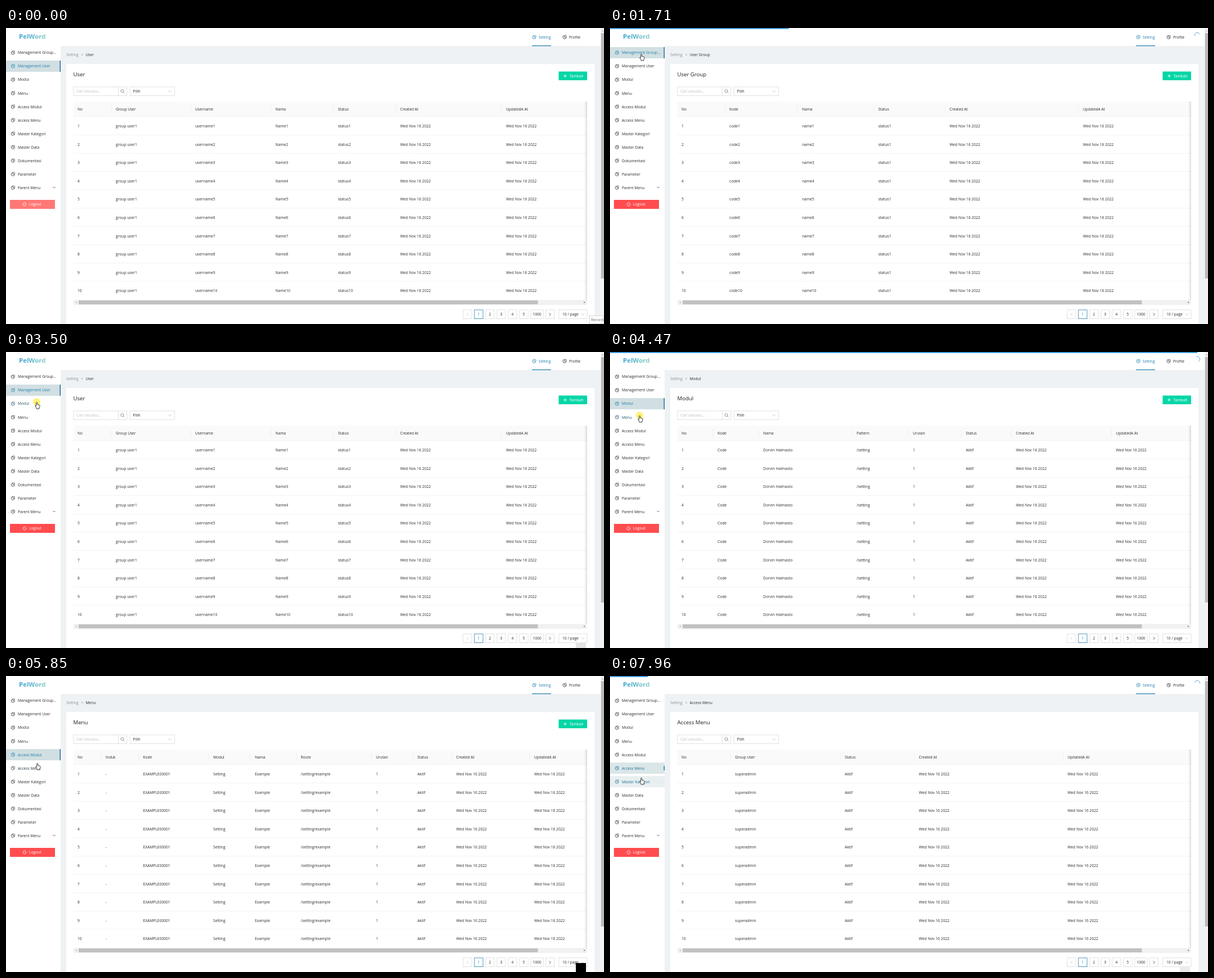
An HTML page with a canvas that plays this animation: 1062x527 px, repeating every 8 s.

```html
<!DOCTYPE html>
<html lang="id">
<head>
<meta charset="utf-8">
<title>Admin panel</title>
<style>
  html, body { margin: 0; width: 100%; height: 100%; overflow: hidden; background: #fff; }
  canvas { display: block; width: 1062px; height: 527px; }
</style>
</head>
<body>
<canvas id="stage"></canvas>
<script>
const W = 1062, H = 527, LOOP = 8000;
const canvas = document.getElementById('stage');
const dpr = window.devicePixelRatio || 1;
canvas.width = W * dpr;
canvas.height = H * dpr;
const c = canvas.getContext('2d');
c.scale(dpr, dpr);

const INK = '#2a2a2a', BLUE = '#1f7fae', LINE = '#d9d9d9', BAR = '#2493dd';
const FONT = '"Open Sans", "Noto Sans", sans-serif';
const DATE = 'Wed Nov 16 2022';

const items = ['Management Group...', 'Management User', 'Modul', 'Menu', 'Access Modul', 'Access Menu',
  'Master Kategori', 'Master Data', 'Dokumentasi', 'Parameter', 'Parent Menu'];

// Columns are [x, heading, cell]; '#' in a cell is the row number.
const page = (title, dateX, updateX, cols, add = true) => ({
  title, add,
  cols: [[127, 'No', '#'], ...cols, [dateX, 'Created At', DATE], [updateX, 'UpdatedA At', DATE]]
});
const accessCols = [[222, 'Group User', 'superadmin'], [417, 'Status', 'Aktif']];
const user = page('User', 700, 888, [[195, 'Group User', 'group user1'], [336, 'Username', 'username#'],
  [478.5, 'Nama', 'Name#'], [589.5, 'Status', 'status#']]);
const group = page('User Group', 603, 840, [[212, 'Kode', 'code#'], [341, 'Nama', 'name#'], [476.5, 'Status', 'status1']]);
const modul = page('Modul', 721, 898.5, [[191, 'Kode', 'Code'], [272, 'Nama', 'Dorvin Halmasto'],
  [438, 'Pattern', '/setting'], [538, 'Urutan', '1'], [632, 'Status', 'Aktif']]);
const menu = page('Menu', 799.5, 938, [[177, 'Induk', '-'], [243.5, 'Kode', 'EXAMPLE00001'], [368, 'Modul', 'Setting'],
  [442, 'Nama', 'Example'], [523.5, 'Route', '/setting/example'], [657, 'Urutan', '1'], [730.5, 'Status', 'Aktif']]);
const accessModul = page('Access Modul', 548.5, 812.5, accessCols, false);
const accessMenu = page('Access Menu', 548.5, 812.5, accessCols, false);

// Timeline
const pages = [[0, user], [1600, group], [2780, user], [4200, modul], [5400, menu], [6530, accessModul], [7260, accessMenu]];
const clicks = [[-1000, 1], [1270, 0], [2490, 1], [3500, 2], [4500, 3], [5540, 4], [6750, 5], [7900, 6]];
const loads = [
  { end: 2250, keys: [[1285, 0], [1480, 85], [1640, 90], [1710, 314], [1850, 800], [1990, 1056]] },
  { end: 3320, keys: [[2540, 0], [2600, 85], [2670, 252], [2870, 740], [3080, 1056]] },
  { end: 4680, keys: [[3550, 0], [3750, 85], [4200, 110], [4330, 640], [4470, 1043]] },
  { end: 5760, keys: [[4700, 0], [4900, 85], [5330, 110], [5430, 700], [5530, 1056]] },
  { end: 6900, keys: [[5900, 0], [6100, 85], [6530, 110], [6620, 600], [6740, 1048]] },
  { end: 7700, keys: [[7040, 0], [7080, 325], [7260, 700], [7400, 1056]] },
  { end: 9000, keys: [[7900, 0], [7960, 67], [8160, 85]] }
];
const builds = [[3480, 4230], [4640, 5430], [5620, 6600], [7945, 9000]];
const path = [[0, 50, 320], [70, 50, 318], [200, 58, 250], [500, 62, 120], [810, 60, 82], [880, 59, 76], [1150, 57, 52],
  [2450, 57, 52], [2560, 59, 71], [3220, 59, 71], [3430, 56, 95], [4270, 55, 97], [4420, 54, 119], [4950, 54, 119],
  [5300, 56, 143], [5700, 57, 146], [5850, 57, 161], [7080, 58, 162], [7600, 58, 164], [7750, 57, 187]];

const clamp = v => Math.max(0, Math.min(1, v));
const smooth = v => v * v * (3 - 2 * v);
const latest = (list, t) => list.filter(k => k[0] <= t).pop();

function along(keys, t, ease = v => v) {
  if (t <= keys[0][0]) return keys[0].slice(1);
  const i = keys.findIndex(k => k[0] > t);
  if (i < 0) return keys[keys.length - 1].slice(1);
  const a = keys[i - 1], b = keys[i], k = ease((t - a[0]) / (b[0] - a[0]));
  return a.slice(1).map((v, j) => v + (b[j + 1] - v) * k);
}

function mix(a, b, k) {
  const rgb = h => [1, 3, 5].map(i => parseInt(h.slice(i, i + 2), 16));
  const q = rgb(b);
  return `rgb(${rgb(a).map((v, i) => Math.round(v + (q[i] - v) * k))})`;
}

// Drawing helpers; text is placed by its vertical middle.
function rect(x, y, w, h, fill) {
  c.fillStyle = fill;
  c.fillRect(x, y, w, h);
}
function box(x, y, w, h, stroke = LINE) {
  rect(x, y, w, h, '#fff');
  c.strokeStyle = stroke;
  c.lineWidth = 0.8;
  c.strokeRect(x + 0.4, y + 0.4, w - 0.8, h - 0.8);
}
function text(s, x, y, fill = INK, size = 6.7, weight = 400, align = 'left') {
  c.font = `${weight} ${size}px ${FONT}`;
  c.textAlign = align;
  c.fillStyle = fill;
  c.fillText(s, x, y + size * 0.36);
}
function line(points, color, width = 0.8) {
  c.strokeStyle = color;
  c.lineWidth = width;
  c.beginPath();
  points.forEach(([x, y]) => c.lineTo(x, y));
  c.stroke();
}
function arc(x, y, r, from, to, color, width = 0.8) {
  c.strokeStyle = color;
  c.lineWidth = width;
  c.beginPath();
  c.arc(x, y, r, from, to);
  c.stroke();
}
function chevron(x, y, dx, dy, color) {
  line(dy ? [[x - dx, y - dy / 2], [x, y + dy / 2], [x + dx, y - dy / 2]]
    : [[x - dx, y - 2.4], [x + dx, y], [x - dx, y + 2.4]], color);
}
function triangle(x, y, dx, dy, fill) {
  c.fillStyle = fill;
  c.beginPath();
  c.moveTo(x + dx, y + dy);
  c.lineTo(x - dx - dy, y - dy + dx);
  c.lineTo(x - dx + dy, y - dy - dx);
  c.fill();
}
function pie(x, y, color) {
  arc(x, y, 3, 0, Math.PI * 1.5, color);
  line([[x, y - 3], [x, y], [x + 3, y]], color);
  arc(x + 0.8, y - 0.8, 2.6, -Math.PI / 2, 0, color);
}

// Share of the last 300 ms during which the pointer was inside a vertical span
function hover(t, top, height) {
  let n = 0;
  for (let k = 0; k < 6; k++) {
    const y = along(path, t - k * 50, smooth)[1] - 6;
    if (y >= top && y < top + height) n++;
  }
  return n / 6;
}

function drawSidebar(t) {
  rect(0, 0, 97, H, '#fff');
  const logo = c.createLinearGradient(23, 0, 70, 0);
  logo.addColorStop(0, '#3a9fd0');
  logo.addColorStop(1, '#86cfc6');
  text('PelWord', 23, 15, logo, 11.4, 700);

  const [at, current] = latest(clicks, t);
  const previous = latest(clicks, at - 1)?.[1];
  const dt = t - at;
  items.forEach((label, i) => {
    const y = 44 + i * 24.03;
    const on = i === current ? clamp(dt / 120) : i === previous ? clamp(1 - dt / 300) : 0;
    const mark = i === current ? clamp((dt - 60) / 100) : i === previous ? clamp(1 - dt / 100) : 0;
    if (on) rect(0, y - 10, 97, 20, mix('#ffffff', '#d1dfe2', on));
    if (mark) rect(95.5, y - 10 * mark, 1.5, 20 * mark, '#226f9c');
    const color = mix(INK, BLUE, Math.max(on, hover(t, y - 10, 20)));
    pie(12.3, y, color);
    text(label, 21, y, color);
  });
  chevron(85.5, 283.8, 2, 2, INK);

  rect(7, 306, 80, 16, mix('#ff4d4f', '#ff7875', hover(t, 306, 16)));
  arc(33.2, 314, 3, 0.7, Math.PI * 2 - 0.7, '#fff');
  line([[33, 314], [37, 314]], '#fff');
  text('Logout', 41, 314, '#fff');
}

function drawHeader() {
  rect(97, 0, 959, 32, '#fff');
  pie(938, 16.3, BLUE);
  text('Setting', 946, 16.3, BLUE);
  rect(934, 31, 34, 1.2, BLUE);
  pie(992, 16.3, INK);
  text('Profile', 1000, 16.3);
}

function drawTable(cols) {
  rect(120, 131, 912, 27, '#fafafa');
  rect(120, 157.5, 912, 0.8, '#f0f0f0');
  cols.forEach(([x, head, cell], i) => {
    if (i) rect(x - 8.5, 138, 0.8, 14, '#ececec');
    text(head, x, 144.8, INK, 6.6, 500);
    for (let r = 0; r < 10; r++) text(cell.replace('#', r + 1), x, 174.8 + r * 32.55);
  });
  for (let r = 1; r < 10; r++) rect(120, 157.6 + r * 32.55, 912, 0.8, '#f0f0f0');
  const shade = c.createLinearGradient(1027, 0, 1032, 0);
  shade.addColorStop(0, 'rgba(0,0,0,0)');
  shade.addColorStop(1, 'rgba(0,0,0,.13)');
  rect(1027, 131, 5, 353, shade);

  rect(120, 484, 912, 9, '#f1f1f1');
  rect(129, 485, 815.5, 7, '#c1c1c1');
  triangle(124.5, 488.5, -1.2, 0, '#a3a3a3');
  triangle(1027.5, 488.5, 1.2, 0, '#505050');
}

function drawPager() {
  const y = 509.8;
  box(811.5, 501.5, 16, 16.5);
  chevron(819.5, y, -1.2, 0, '#c4c4c4');
  ['1', '2', '3', '4', '5', '1000'].forEach((s, i) => {
    const x = 831.5 + i * 20, w = s.length > 1 ? 23 : 16;
    box(x, 501.5, w, 16.5, i ? LINE : BLUE);
    text(s, x + w / 2, y, i ? INK : BLUE, 6.7, i ? 400 : 500, 'center');
  });
  box(958, 501.5, 16, 16.5);
  chevron(966, y, 1.2, 0, INK);
  box(981.5, 501.5, 51, 16.5);
  text('10 / page', 988, y);
  chevron(1024.5, y, 2.4, 2.6, '#bfbfbf');
}

function drawContent(p) {
  rect(97, 32, 959, H - 32, '#eff2f4');
  text('Setting', 107, 48, '#8e9092');
  text('>', 133.5, 48, '#8e9092');
  text(p.title, 141.5, 48);
  rect(107, 64, 938, H - 64, '#fff');
  text(p.title, 119.5, 82.7, '#1c1c1c', 9.6, 500);
  if (p.add) {
    rect(981.5, 77.5, 50.5, 15.5, '#06d6a6');
    line([[990, 85.3], [996, 85.3]], '#fff', 0.9);
    line([[993, 82.3], [993, 88.3]], '#fff', 0.9);
    text('Tambah', 1000.5, 85.3, '#fff');
  }
  box(119.5, 104.5, 80.5, 16.5);
  text('Cari sesuatu...', 125, 113, '#bfbfbf');
  box(199.2, 104.5, 16, 16.5);
  arc(206.4, 112.2, 2.5, 0, Math.PI * 2, '#777');
  line([[208.2, 114], [210.3, 116.1]], '#777');
  box(219.7, 104.5, 80, 16.5);
  text('Pilih', 225.5, 113);
  chevron(291, 112.8, 2.6, 2.8, '#bfbfbf');
  drawTable(p.cols);
  drawPager();
}

function drawScrollbar() {
  rect(1056, 0, 6, H, '#f1f1f1');
  rect(1056.8, 9, 5.2, 437, '#b9b9b9');
  triangle(1059.5, 5, 0, -1.1, '#8a8a8a');
}

function drawLoading(t) {
  for (const { keys, end } of loads) {
    const start = keys[0][0], full = keys[keys.length - 1][0];
    if (t < start || t >= end) continue;
    c.globalAlpha = 1 - clamp((t - full) / (end - full));
    rect(0, 0, along(keys, t)[0], 1.7, BAR);
    const turn = (t - start) / 400 * Math.PI * 2;
    arc(1043, 12.6, 4.6, turn + Math.PI * 0.75, turn + Math.PI * 1.75, '#4ba0d5', 0.9);
    c.globalAlpha = 1;
  }
  for (const [from, to] of builds) {
    const k = Math.min(clamp((t - from) / 190), clamp((to - t) / 190));
    if (!k) continue;
    c.globalAlpha = k;
    rect(1012, 511 + 8 * (1 - k), 18, 18, '#000');
    c.globalAlpha = 1;
  }
}

const hand = new Path2D('M-2.3-5Q-1.3-6.5-.3-5V-1.6L3.4-.7Q4.4-.2 4.1 1.5L3 4V6H-2V4.4L-4.4.9Q-4.2-.5-2.3 1.1Z');
function drawPointer(t) {
  if (t < 70) return;
  const [x, y] = along(path, t, smooth);
  if (clicks.some(([at]) => t > at - 50 && t < at + 40)) {
    c.fillStyle = 'rgba(255,235,40,.65)';
    c.beginPath();
    c.arc(x - 1.5, y - 6, 6.5, 0, Math.PI * 2);
    c.fill();
  }
  c.save();
  c.translate(x, y);
  c.fillStyle = '#fff';
  c.fill(hand);
  c.strokeStyle = '#222';
  c.lineWidth = 0.9;
  c.stroke(hand);
  c.restore();
}

function draw(t) {
  rect(0, 0, W, H, '#fff');
  drawContent(latest(pages, t)[1]);
  drawHeader();
  drawSidebar(t);
  drawScrollbar();
  drawLoading(t);
  if (t < 140) {
    box(1036, 512, 26, 15, '#c8c8c8');
    text('Record', 1039, 519.8, '#666');
  }
  drawPointer(t);
}

const began = performance.now();
function tick() {
  draw((performance.now() - began) % LOOP);
  requestAnimationFrame(tick);
}
tick();
</script>
</body>
</html>
```
